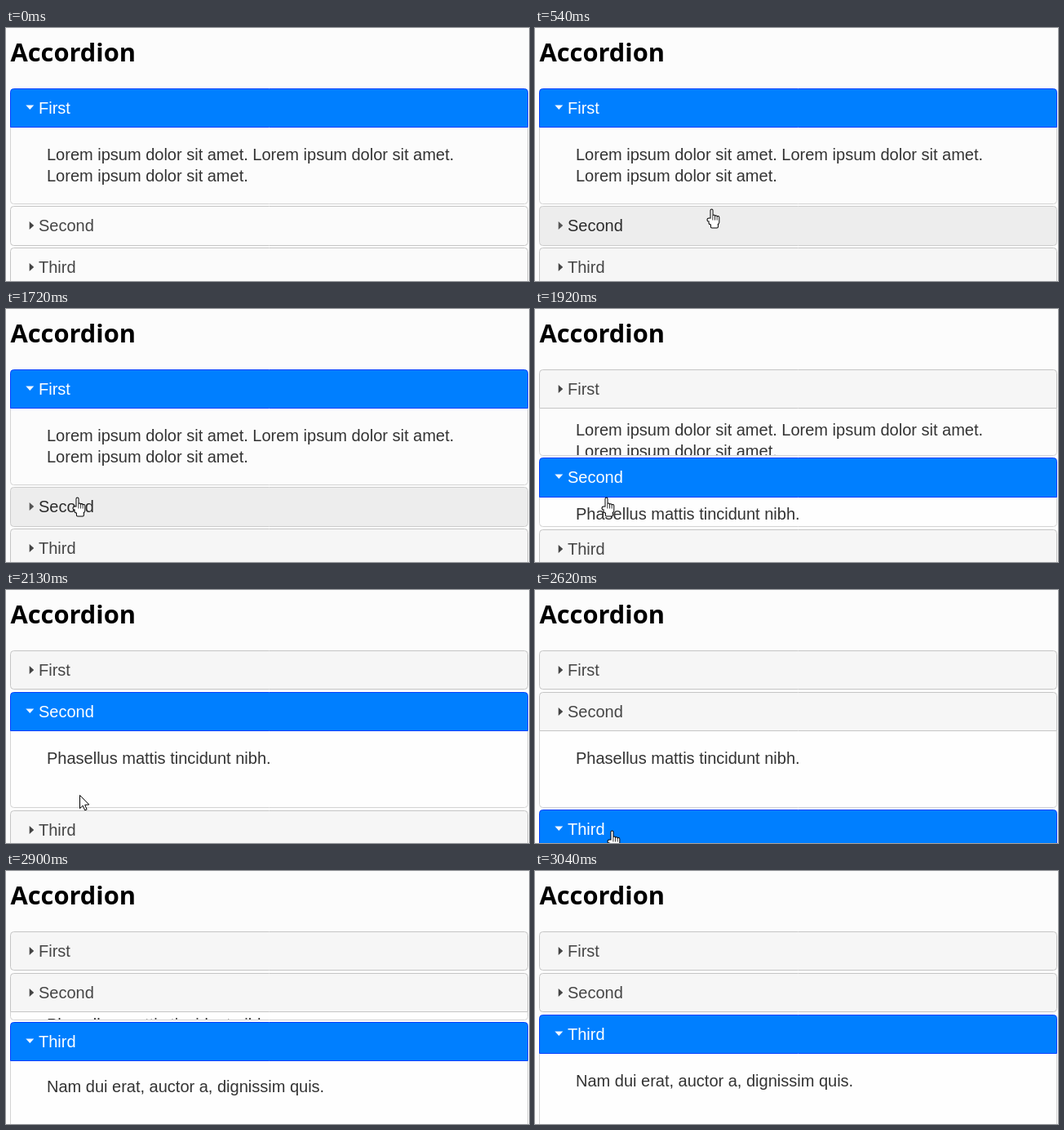
An HTML page with a canvas for the animation above (3.57 s loop, 641 px wide and 310 px high).

```html
<!DOCTYPE html>
<html lang="en">
<head>
<meta charset="utf-8">
<title>Accordion</title>
<style>
  html, body { margin: 0; width: 100%; height: 100%; overflow: hidden; background: #fcfcfc; }
  canvas { display: block; }
</style>
</head>
<body>
<canvas id="stage" width="641" height="310"></canvas>
<script>
const ctx = document.getElementById('stage').getContext('2d');
const LOOP = 3570, WAKE = 270, STEP = 69, SLIDE = 375;
const LEFT = 5, RIGHT = 640, TOP = 74, HEAD = 48.4, GAP = 2.5, PAD = 20, LINE = 26;
const BODY_FONT = '20px "Liberation Sans", Arial, sans-serif';
const TITLE_FONT = 'bold 30.8px "Open Sans", "Noto Sans", sans-serif';

const sections = [
  { title: 'First', height: 93.5, fill: '#fcfcfc',
    lines: ['Lorem ipsum dolor sit amet. Lorem ipsum dolor sit amet.', 'Lorem ipsum dolor sit amet.'] },
  { title: 'Second', height: 94.2, fill: '#fefefe', lines: ['Phasellus mattis tincidunt nibh.'] },
  { title: 'Third', height: 94.2, fill: '#fefefe', lines: ['Nam dui erat, auctor a, dignissim quis.'] }
];
const clicks = [1766, 2593];

const path = [
  { t: WAKE, x: 306, y: 298 },
  { t: 750, x: 152, y: 164 },
  { t: 1030, x: 108, y: 57 },
  { t: 1340, x: 88, y: 230 },
  { t: 1970, x: 88, y: 230 },
  { t: 2470, x: 95, y: 294 },
  { t: 2830, x: 95, y: 294 },
  { t: 2970, x: 96, y: 335 }
];

// The screen refreshes at a fixed rate
function snap(t) {
  return t < WAKE ? 0 : WAKE + STEP * Math.floor((t - WAKE) / STEP + .1);
}

function swing(t, start) {
  const p = Math.min(1, Math.max(0, (t - start) / SLIDE));
  return .5 - Math.cos(p * Math.PI) / 2;
}

function pointer(t) {
  const i = path.findIndex(key => key.t > t);
  if (i < 1) return null;
  const a = path[i - 1], b = path[i], k = (t - a.t) / (b.t - a.t);
  return { x: a.x + (b.x - a.x) * k, y: a.y + (b.y - a.y) * k, resting: a.y === b.y };
}

function layout(t) {
  const [a, b] = clicks.map(c => swing(t, c));
  const open = [1 - a, a - b, b];
  const active = clicks.filter(c => t > c).length;
  let y = TOP;
  return sections.map((s, i) => {
    const top = y, mid = top + HEAD, bottom = mid + s.height * open[i];
    y = bottom + GAP;
    return {
      ...s, open: open[i], active: i === active,
      top: Math.round(top), mid: Math.round(mid), bottom: Math.round(bottom),
      baseline: Math.round(mid + PAD + PAD * open[i])
    };
  });
}

function box(x0, y0, x1, y1, radii, fill, line) {
  ctx.beginPath();
  ctx.roundRect(x0 + .5, y0 + .5, x1 - x0 - 1, y1 - y0 - 1, radii);
  ctx.fillStyle = fill;
  ctx.fill();
  ctx.strokeStyle = line;
  ctx.lineWidth = 1;
  ctx.stroke();
}

function label(text, x, y, color, font = BODY_FONT) {
  ctx.font = font;
  ctx.fillStyle = color;
  ctx.fillText(text, x, y);
}

function triangle(x, y, angle, color) {
  ctx.save();
  ctx.translate(x, y);
  ctx.rotate(angle);
  ctx.fillStyle = color;
  ctx.fill(new Path2D('M-2.7 -5L2.8 0L-2.7 5Z'));
  ctx.restore();
}

function drawPanel(row) {
  const h = row.bottom - row.mid;
  if (h < 2) return;
  ctx.save();
  ctx.beginPath();
  ctx.rect(LEFT, row.mid, RIGHT - LEFT, h);
  ctx.clip();
  box(LEFT, row.mid - 1, RIGHT, row.bottom, [0, 0, 4, 4], row.fill, '#d3d3d3');
  ctx.beginPath();
  ctx.rect(LEFT + 1, row.mid, RIGHT - LEFT - 2, h - 1);
  ctx.clip();
  row.lines.forEach((line, i) => label(line, 50, row.baseline + i * LINE, '#333'));
  ctx.restore();
}

function drawHead(row, hover, fresh) {
  let fill = fresh ? '#fbfbfb' : '#f6f6f6', line = '#c5c5c5', ink = '#454545', icon = '#444';
  if (row.active) [fill, line, ink, icon] = ['#007fff', '#003eff', '#fff', '#f0f6ff'];
  else if (hover) [fill, line, ink, icon] = ['#ededed', '#ccc', '#2b2b2b', '#555'];
  const r = row.active || row.open > .01 ? 0 : 4;
  box(LEFT, row.top, RIGHT, row.mid, [4, 4, r, r], fill, line);
  if (row.active) triangle(29.3, row.top + 23.3, Math.PI / 2, icon);
  else triangle(31.4, row.top + 24, 0, icon);
  label(row.title, 40, row.top + 31, ink);
}

function arrowShape() {
  return new Path2D('M0 0V16.2L3.7 12.7L6.2 18.4L8.6 17.4L6.2 11.8L11.3 11.5Z');
}

// Index finger, three folded fingers, thumb and palm as rounded bars
function handShape() {
  const hand = new Path2D();
  hand.roundRect(-2, 1, 2, 16, 1);
  for (let i = 0; i < 3; i++) hand.roundRect(.8 + i * 2.6, 8 + i * .8, 1.8, 8, 1);
  hand.roundRect(-6, 12, 5, 3, 1.5);
  hand.roundRect(-4, 14, 11.4, 5, 2);
  hand.roundRect(-1.6, 14, 8, 9, 1);
  return hand;
}

function drawPointer(x, y, hand) {
  const shape = hand ? handShape() : arrowShape();
  ctx.save();
  ctx.translate(Math.round(x) + .5, Math.round(y) + .5);
  ctx.lineJoin = 'round';
  ctx.lineWidth = hand ? 2 : 1;
  ctx.strokeStyle = '#000';
  ctx.fillStyle = '#fff';
  if (hand) ctx.stroke(shape);
  ctx.fill(shape);
  if (!hand) ctx.stroke(shape);
  ctx.restore();
}

function draw(t) {
  ctx.fillStyle = '#fcfcfc';
  ctx.fillRect(0, 0, 641, 310);
  label('Accordion', 5.5, 41, '#000', TITLE_FONT);

  const rows = layout(t), at = pointer(t);
  const over = row => at !== null && at.y >= row.top && at.y < row.mid;
  rows.forEach(drawPanel);
  rows.forEach(row => drawHead(row, over(row), t < WAKE));
  if (at) drawPointer(at.x, at.y, at.resting || rows.some(over));
}

const begin = performance.now();
function tick() {
  draw(snap((performance.now() - begin) % LOOP));
  requestAnimationFrame(tick);
}
tick();
</script>
</body>
</html>
```
